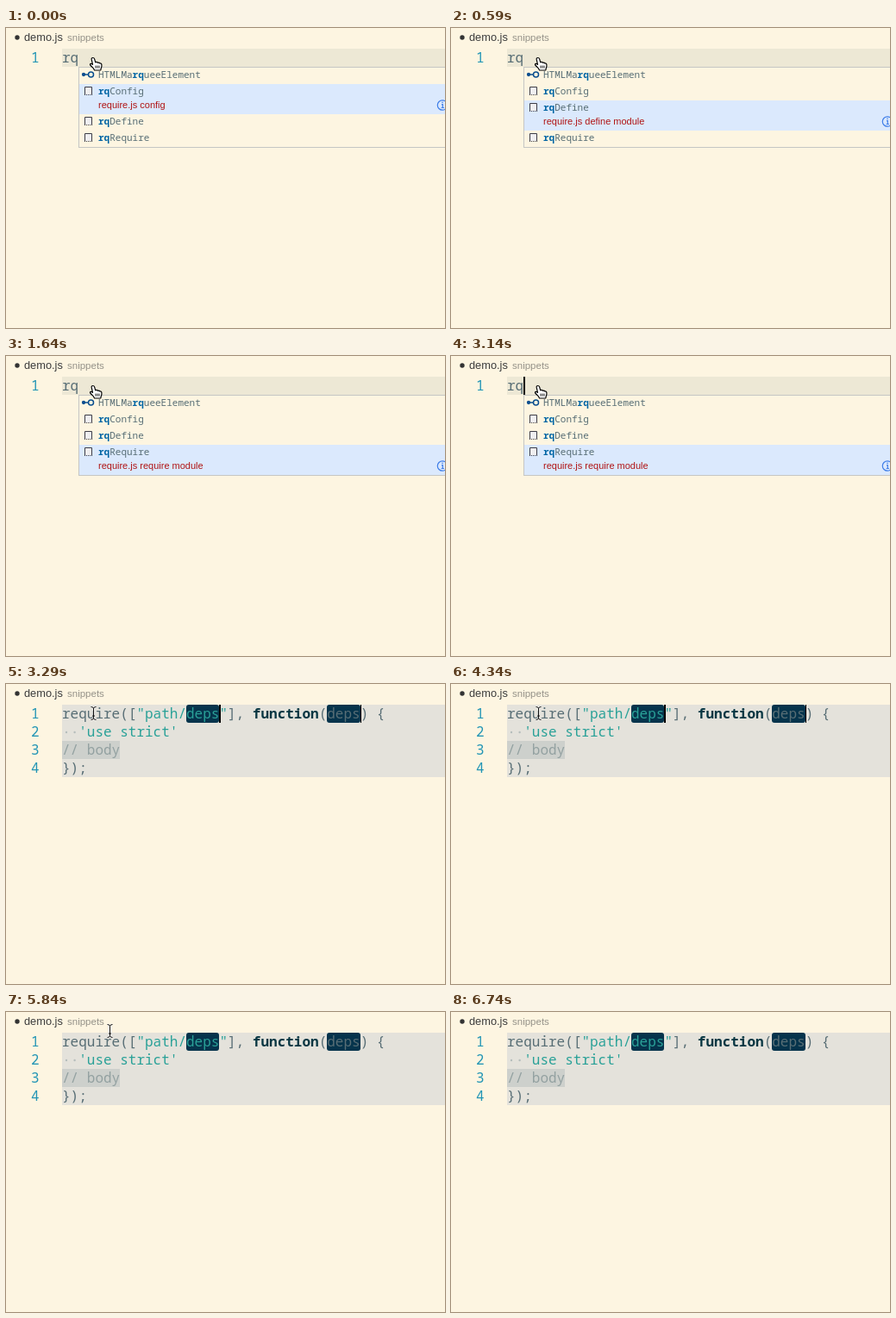
Animation, 509 px wide and 348 px high, one loop 7.03 s. Source, as an HTML page:

```html
<!DOCTYPE html>
<html lang="en">
<head>
<meta charset="utf-8">
<title>Snippet completion</title>
<style>
  html, body { margin: 0; width: 100%; height: 100%; overflow: hidden; background: #fdf5e1; }
  svg { display: block; }
  text { white-space: pre; font-family: "Liberation Sans", Arial, sans-serif; }
  .code, .item { font-family: "Noto Sans Mono", "DejaVu Sans Mono", monospace; fill: #586e75; }
  .code { font-size: 16px; font-weight: 500; }
  .item { font-size: 11px; }
  .item tspan { font-weight: 700; fill: #0065a4; }
  .detail { font-size: 11px; fill: #b01414; }
  .code.number { fill: #2295b5; }
  .string { fill: #2aa198; }
  .keyword { fill: #073642; font-weight: 700; }
  .comment { fill: #93a1a1; }
</style>
</head>
<body>
<svg id="stage" width="509" height="348" viewBox="0 0 509 348"></svg>
<script>
const LOOP = 7030, LEFT = 65, CHAR = 9.6, LINE = 21, TOP = 24;
const stage = document.getElementById('stage');

const rect = (x, y, w, h, fill, extra = '') =>
  `<rect x="${x}" y="${y}" width="${w}" height="${h}" fill="${fill}" ${extra}/>`;
const text = (x, y, cls, content) => `<text x="${x}" y="${y}" class="${cls}">${content}</text>`;
const span = (cls, content) => `<tspan class="${cls}">${content}</tspan>`;
const baseline = line => TOP + LINE * line + 16;
const codeLine = (line, content, column = 0) =>
  text(LEFT + CHAR * column, baseline(line), 'code', content);
const lineNumber = line => text(29, baseline(line), 'code number', line + 1);
const caret = (x, line = 0, width = 2) => rect(x, TOP + LINE * line, width, LINE, '#000');
const selected = (x, line, width) =>
  rect(x, TOP + LINE * line, width, LINE, '#06344c', 'rx="3"');
const placeholder = (x, line, width) => rect(x, TOP + LINE * line, width, LINE, '#cdd0cc');

// Value of the last [start, value] step reached at time t.
const at = (steps, t) => steps.filter(([start]) => start <= t).pop()[1];

const selectionSteps = [[0, 1], [140, 2], [890, 3]];
const caretSteps = [[0, 0], [140, 1], [590, 0], [1040, 1], [1640, 0], [2090, 1], [2540, 0],
  [3140, 1], [3740, 0], [4340, 1], [5090, 0], [5240, 1], [5840, 0], [6290, 1], [6740, 0]];
const pointerSteps = [[0, [101.5, 34]], [5840, [120.5, 22]], [5990, [215.5, 84]], [6140, null]];

const title = `<circle cx="13" cy="11" r="2.7" fill="#333"/>
  <text x="21" y="15" font-size="12.8" fill="#3c3c3c">demo.js</text>
  <text x="71" y="15" font-size="11.5" fill="#949188">snippets</text>`;

const hand = `<path d="M99.2 36.4q-.2-1.9 1.6-1.9 1.4 0 1.9 1.7l1 3.6q1.8-.9 2.6.5
  1.8-.6 2.4.7 2-.3 2.2 1.6.3 2-.7 4.2l-.4 2.2h-7.2q-1-2.4-3.2-4.2-2.4-2-1.8-3
  .8-1.2 2.9.6z" fill="#fff" stroke="#000" stroke-width="1.2" stroke-linejoin="round"/>
  <path d="M104 43.6v3m2-3v3m2-3v3" stroke="#000" stroke-width=".9"/>`;

function beam([x, y]) {
  const d = `M${x - 3} ${y - 7.5}q3 0 3 2v11q0 2-3 2M${x + 3} ${y - 7.5}q-3 0-3 2v11q0 2 3 2M${x - 1.5} ${y + 3}h3`;
  return `<g fill="none"><path d="${d}" stroke="#fff" stroke-opacity=".7" stroke-width="2"/>
    <path d="${d}" stroke="#111"/></g>`;
}

const linkIcon = y => `<g stroke="#0b4f8f" stroke-width="1.5" fill="#fdf5e1">
  <path d="M90 ${y}h6"/><circle cx="98.5" cy="${y}" r="3"/>
  <circle cx="90" cy="${y}" r="1.4" fill="#0b4f8f"/></g>`;

const snippetIcon = y => `<g fill="none" stroke="#3c3c46">
  <path d="M91.5 ${y + 4}v-8.5h8v8.5" fill="#f0eff1"/>
  <path d="M91 ${y + 4.5}h9" stroke-dasharray="1 1"/></g>`;

const infoIcon = y => `<circle cx="506" cy="${y}" r="5.7" fill="none" stroke="#3f7ee8" stroke-width="1.2"/>
  <path d="M505 ${y - .8}h1.3v3.8m-1.6 0h3.2M505.3 ${y - 3.2}h1.4" fill="none" stroke="#3f7ee8" stroke-width="1.2"/>`;

const items = [
  ['HTMLMa', 'ueeElement'],
  ['', 'Config', 'require.js config'],
  ['', 'Define', 'require.js define module'],
  ['', 'Require', 'require.js require module'],
];

function popup(selection) {
  let y = 46;
  let out = rect(84.5, 45.5, 440, 93, '#fdf5e1', 'stroke="#c5c6c4"');
  items.forEach(([before, after, detail], i) => {
    const active = i === selection;
    if (active) {
      out += rect(85, y, 424, 35, '#dbe9fd') + text(107, y + 28, 'detail', detail) + infoIcon(y + 24.5);
    }
    out += (i ? snippetIcon : linkIcon)(y + 8);
    out += text(107, y + 12, 'item', `${before}<tspan>rq</tspan>${after}`);
    y += active ? 35 : 19;
  });
  return out;
}

function completion(t, caretOn) {
  return rect(65, TOP, 444, LINE, '#ede8d5') + lineNumber(0) + codeLine(0, 'rq')
    + popup(at(selectionSteps, t)) + (caretOn ? caret(84) : '') + hand;
}

function snippet(t, caretOn) {
  const onBody = t >= 4640 && t < 5240;
  const marks = onBody
    ? placeholder(209, 0, 38) + selected(65, 2, 67)
    : selected(209, 0, 38) + selected(372, 0, 39) + placeholder(65, 2, 67);
  const carets = onBody ? caret(132, 2) : caret(247) + caret(411, 0, 1);
  const pointer = at(pointerSteps, t);
  const dots = [70, 79.6].map(x => `<circle cx="${x}" cy="56" r="1.2" fill="#b6bebc"/>`).join('');
  return rect(65, TOP, 444, LINE * 4, '#e4e2db') + marks
    + [0, 1, 2, 3].map(lineNumber).join('')
    + codeLine(0, `require([${span('string', '"path/deps"')}], ${span('keyword', 'function')}(deps) {`)
    + dots + codeLine(1, span('string', "'use strict'"), 2)
    + codeLine(2, span('comment', '// body'))
    + codeLine(3, '});')
    + (caretOn ? carets : '') + (pointer ? beam(pointer) : '');
}

let shown = '';
function draw() {
  const t = performance.now() % LOOP;
  const scene = t < 3290 ? completion : snippet;
  const picture = title + scene(t, at(caretSteps, t));
  if (picture !== shown) stage.innerHTML = shown = picture;
  requestAnimationFrame(draw);
}
draw();
</script>
</body>
</html>
```
